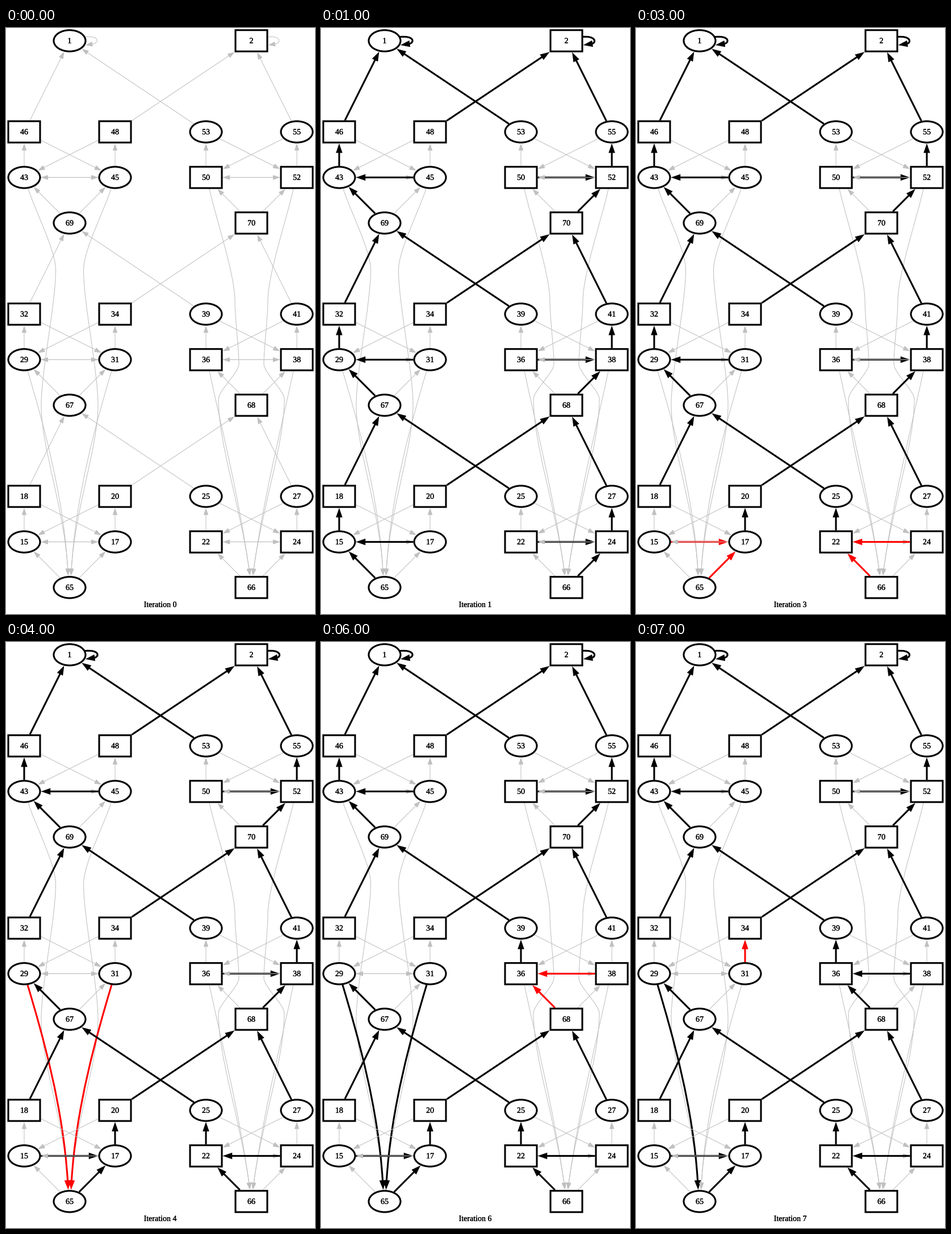
Recreate the animation shown at these times as a matplotlib script. Size 544 px wide and 1029 px high, loop 8 s.

```python
import math

import matplotlib.pyplot as plt
from matplotlib.animation import FuncAnimation
from matplotlib.patches import Ellipse, PathPatch, Polygon, Rectangle
from matplotlib.path import Path
from matplotlib.patheffects import withStroke

W, H, DPI = 544, 1029, 72
STEP = 80                       # grid pitch of the layout
LEFT, TOP = 32, 22.4
HALF_W, HALF_H = 28, 18.7
THIN, THICK = 1.04, 3.1
HEAD_LEN, HEAD_HALF = 10.4, 3.6
GREY = "#c0c0c0"

nodes = {}   # id -> (x, y, is_box)
edges = []   # (source, target, bezier points) in drawing order


def goals(block):
    """Round and square node at the upper end of a block."""
    return (1, 2) if block == 2 else (67 + 2 * block, 68 + 2 * block)


def add_node(name, col, row, is_box):
    nodes[name] = (LEFT + STEP * col, TOP + STEP * row, is_box)


def place_nodes():
    for block in range(-1, 3):
        row = 8 - 4 * block
        for i, name in enumerate(goals(block)):
            add_node(name, 1 + 4 * i, row, i == 1)
    for block in range(3):
        row = 10 - 4 * block
        for side in range(2):
            for i in range(2):
                low = 15 + 14 * block + 7 * side + 2 * i
                col = 4 * side + 2 * i
                add_node(low, col, row + 1, side == 1)
                add_node(low + 3, col, row, side == 0)


def straight(a, b):
    """Segment between two nodes, cut at their outer borders."""
    (xa, ya, _), (xb, yb, _) = nodes[a], nodes[b]
    dist = math.hypot(xb - xa, yb - ya)
    ux, uy = (xb - xa) / dist, (yb - ya) / dist

    def reach(is_box):
        p = abs(ux) / (HALF_W + THICK / 2)
        q = abs(uy) / (HALF_H + THICK / 2)
        return 1 / (max(p, q) if is_box else math.hypot(p, q))

    ra, rb = reach(nodes[a][2]), reach(nodes[b][2])
    return [(xa + ux * ra, ya + uy * ra), (xb - ux * rb, yb - uy * rb)]


def sway(keys, lean_out, lean_in):
    """Smooth path through the keys, upright at every inner key."""
    points = [keys[0]]
    for i, ((xa, ya), (xb, yb)) in enumerate(zip(keys, keys[1:])):
        last = i == len(keys) - 2
        out = 0.25 * (yb - ya)
        back = (0.4 if last else 0.25) * (yb - ya)
        points += [(xa + (lean_out * out if i == 0 else 0), ya + out),
                   (xb - (lean_in * back if last else 0), yb - back),
                   (xb, yb)]
    return points


def way_down(block, side):
    """Long curve from the left node of a pair to the bottom node."""
    tip = (LEFT + STEP * (1 + 4 * side) - 2.5, 961.8)
    x = LEFT + STEP * 4 * side + 6
    if block == 1:
        keys = [(x, 602), tip]
    elif side == 0:
        keys = [(x + 1, 282), (87.5, 425), (62, 662), tip]
    else:
        keys = [(x, 282), (403, 480), (410, 590), (374, 652), tip]
    return sway(keys, *((0.21, 0.14) if side else (0.3, 0.06)))


def link(a, b, points=None):
    edges.append((a, b, points or straight(a, b)))


def link_loop(name, tip_dx):
    x, y, _ = nodes[name]
    link(name, name, [(x + 26, y - 6.6), (x + 53, y - 9.9),
                      (x + 53, y + 4), (x + tip_dx, y + 7.6)])


def link_side(block, side):
    a = 15 + 14 * block + 7 * side
    pair, upper = (a, a + 2), (a + 3, a + 5)
    bottom = 65 + side
    for i in range(2):
        link(pair[i], upper[i])
        link(pair[i], pair[1 - i])
        if block:
            curve = way_down(block, side)
            axis = nodes[bottom][0]
            link(pair[i], bottom,
                 [(2 * axis - x, y) for x, y in curve] if i else curve)
    for i in range(2):
        link(upper[i], goals(block)[i])
        link(upper[i], pair[1 - i])
        link(bottom + 2 * block, pair[i])


def place_edges():
    link_loop(1, 27.8)
    link_loop(2, HALF_W + THICK / 2)
    for block in (2, 1, 0):
        for side in range(2):
            link_side(block, side)


def first_choice():
    choice = {1: 1, 2: 2}
    for block in range(3):
        for side in range(2):
            a = 15 + 14 * block + 7 * side
            best, other = (a + 2, a) if side else (a, a + 2)
            choice[65 + 2 * block + side] = choice[other] = best
            choice[best] = best + 3
            choice[a + 3], choice[a + 5] = goals(block)
    return choice


# Node -> new target, for each iteration after the first.
SWITCHES = {
    2: {17: 20, 22: 25},
    3: {65: 17, 15: 17, 24: 22, 66: 22},
    4: {29: 65, 31: 65},
    5: {36: 39},
    6: {38: 36, 68: 36},
    7: {31: 34},
}


def draw_edge(points, color, lw):
    (px, py), (tx, ty) = points[-2:]
    dist = math.hypot(tx - px, ty - py)
    ux, uy = (tx - px) / dist, (ty - py) / dist
    # Pull the head back so that its mitred tip ends on the border.
    miter = lw / 2 * math.hypot(HEAD_LEN, HEAD_HALF) / HEAD_HALF
    tx, ty = tx - ux * miter, ty - uy * miter
    bx, by = tx - ux * HEAD_LEN, ty - uy * HEAD_LEN
    code = Path.LINETO if len(points) == 2 else Path.CURVE4
    codes = [Path.MOVETO] + [code] * (len(points) - 1)
    style = dict(ec=color, lw=lw, zorder=1, snap=False)
    ax.add_patch(PathPatch(Path(points[:-1] + [(bx, by)], codes),
                           fill=False, capstyle="butt", **style))
    nx, ny = -uy * HEAD_HALF, ux * HEAD_HALF
    ax.add_patch(Polygon([(bx + nx, by + ny), (tx, ty), (bx - nx, by - ny)],
                         fc=color, joinstyle="miter", **style))


def draw_text(x, y, text):
    ax.text(x, y, text, ha="center", va="baseline", family="Liberation Serif",
            fontsize=14, color="black", zorder=3,
            path_effects=[withStroke(linewidth=0.3, foreground="black")])


def draw_node(name, x, y, is_box):
    style = dict(fc="white", ec="black", lw=THICK, zorder=2, snap=False)
    if is_box:
        shape = Rectangle((x - HALF_W, y - HALF_H), 2 * HALF_W, 2 * HALF_H, **style)
    else:
        shape = Ellipse((x, y), 2 * HALF_W, 2 * HALF_H, **style)
    ax.add_patch(shape)
    draw_text(x, y + 4.3, str(name))


def draw(step):
    ax.clear()
    ax.set_xlim(0, W)
    ax.set_ylim(H, 0)
    ax.axis("off")
    choice = first_choice() if step else {}
    for i in range(2, step + 1):
        choice.update(SWITCHES[i])
    fresh = SWITCHES.get(step, {})
    for a, b, points in edges:
        if choice.get(a) != b:
            draw_edge(points, GREY, THIN)
        else:
            draw_edge(points, "red" if a in fresh else "black", THICK)
    for name, spot in nodes.items():
        draw_node(name, *spot)
    draw_text(271.5, 1016.6, f"Iteration {step}")
    return []


place_nodes()
place_edges()
fig = plt.figure(figsize=(W / DPI, H / DPI), dpi=DPI, facecolor="white")
ax = fig.add_axes([0, 0, 1, 1])
anim = FuncAnimation(fig, draw, frames=8, interval=1000, repeat=True,
                     repeat_delay=0, init_func=lambda: [], blit=False)
plt.show()
```
